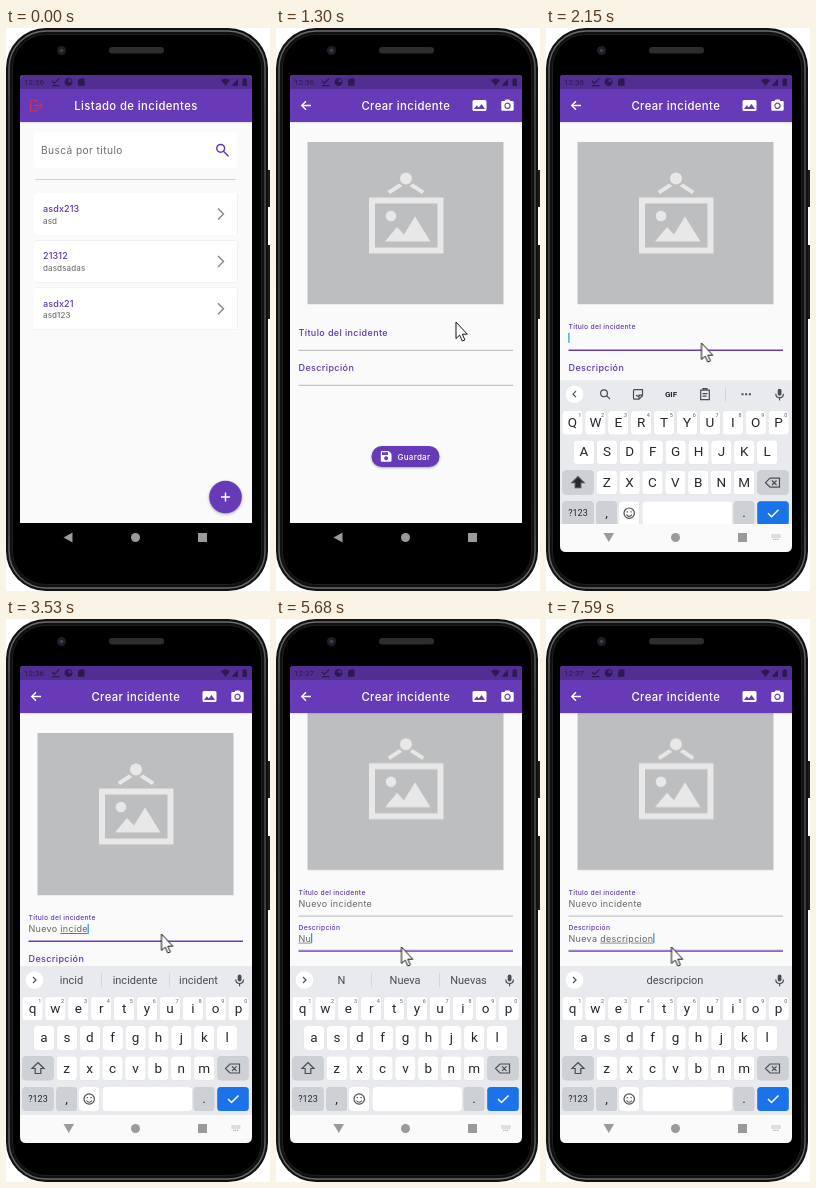
An HTML page that plays this animation: 264 px wide and 563 px high, repeating every 8 s.

```html
<!DOCTYPE html>
<html lang="es">
<head>
<meta charset="utf-8">
<title>Crear incidente</title>
<style>
  html, body { margin: 0; width: 100%; height: 100%; overflow: hidden; background: #fff; }
  svg { display: block; }
  text { font-family: Inter, "Open Sans", sans-serif; white-space: pre; }
  .mid { text-anchor: middle; }
  .title { font-size: 11.3px; font-weight: 500; fill: #fff; letter-spacing: .4px; }
  .label { font-size: 9px; font-weight: 500; fill: #5e35b1; letter-spacing: .38px; }
  .value { font-size: 9px; fill: #666; letter-spacing: .31px; }
  .word { text-decoration: underline; }
  .name { font-size: 9px; font-weight: 500; fill: #5e35b1; letter-spacing: .12px; }
  .note { font-size: 8px; font-weight: 500; fill: #757575; letter-spacing: .1px; }
  .soft { filter: drop-shadow(0 .8px .8px #0004); }
  .card { filter: drop-shadow(0 .9px .4px #0003); }
  #kb text { font-family: Roboto, "Noto Sans", sans-serif; text-anchor: middle; fill: #25282c; }
  #kb .key { font-size: 13.5px; }
  #kb.caps .key { text-transform: uppercase; }
  #kb.caps #shift { fill: #25282c; }
  #kb .sup { font-size: 5.5px; fill: #5f6368; }
  #kb .sug { font-size: 11px; fill: #4a4d51; }
  .ico { fill: none; stroke: #4a4d51; stroke-width: 1.2; }

  #cursor, #page, #kb, #scroll, #lab1, #lab2, #line1, #line2, #ripple {
    animation: 8s infinite both;
  }
  #cursor { animation-name: cursor; }
  #page { animation-name: page; }
  #kb { animation-name: rise; }
  #scroll { animation-name: scroll; }
  #lab1 { animation-name: lab1; }
  #lab2 { animation-name: lab2; }
  #line1 { animation-name: line1; }
  #line2 { animation-name: line2; }
  #ripple { animation-name: ripple; }

  @keyframes cursor {
    0%, 1.5% { transform: translate(239px, 564px); }
    6.25%, 13.1% { transform: translate(224px, 475px); }
    16.25% { transform: translate(180px, 294px); }
    19.25%, 52.9% { transform: translate(155.5px, 315px); }
    57%, 100% { transform: translate(125.5px, 328px); }
  }
  @keyframes ripple {
    0%, 9.6% { opacity: 0; }
    11%, 100% { opacity: .25; }
  }
  @keyframes page {
    0%, 10.6% { opacity: 0; transform: translateY(112px); animation-timing-function: ease-out; }
    14.4%, 100% { opacity: 1; transform: none; }
  }
  @keyframes rise {
    0%, 22.25% { transform: translateY(150px); animation-timing-function: cubic-bezier(0, 0, .2, 1); }
    28.4%, 100% { transform: none; }
  }
  @keyframes scroll {
    0%, 56.9% { transform: none; }
    59.2%, 69.2% { transform: translateY(-23.5px); }
    70.5%, 100% { transform: translateY(-25.3px); }
  }
  @keyframes lab1 {
    0%, 20% { transform: translate(22.5px, 308px); }
    22.5%, 100% { transform: translate(22.5px, 301.3px) scale(.75); }
  }
  @keyframes lab2 {
    0%, 57.9% { transform: translate(22.5px, 343px); animation-timing-function: linear; }
    60.9%, 100% { transform: translate(22.5px, 336.3px) scale(.75); }
  }
  @keyframes line1 {
    0%, 20% { stroke: #b4b4b4; stroke-width: 1px; }
    22.5%, 57.4% { stroke: #673ab7; stroke-width: 1.6px; }
    59.3%, 100% { stroke: #b4b4b4; stroke-width: 1px; }
  }
  @keyframes line2 {
    0%, 57.9% { stroke: #b4b4b4; stroke-width: 1px; }
    60.9%, 100% { stroke: #673ab7; stroke-width: 1.6px; }
  }
</style>
</head>
<body>
<svg width="264" height="563" viewBox="0 0 264 563">
  <defs>
    <clipPath id="app"><path d="M14 495V51q0-4 4-4H242q4 0 4 4V495Z"/></clipPath>
    <clipPath id="screen"><path d="M14 47H246V518q0 6-6 6H20q-6 0-6-6Z"/></clipPath>
    <linearGradient id="rim" x2="0" y2="1">
      <stop stop-color="#6b6b6b"/><stop offset=".15" stop-color="#4a4a4a"/>
      <stop offset=".85" stop-color="#4a4a4a"/><stop offset="1" stop-color="#6b6b6b"/>
    </linearGradient>
  </defs>

  <!-- phone -->
  <path d="M260 142h4v37h-4zM260 217h4v74h-4z" fill="#1c1c1c"/>
  <rect width="262" height="563" rx="40" fill="#101010"/>
  <rect x="3" y="3" width="256" height="557" rx="37" fill="none" stroke="url(#rim)" stroke-width="1.5"/>
  <rect x="6.500" y="6.500" width="249" height="550" rx="33" fill="#000" stroke="#1e1e1e"/>
  <circle cx="55.500" cy="22.500" r="4.500" fill="#1d1f22"/>
  <circle cx="55.500" cy="22.500" r="1.800" fill="#3a4450"/>
  <rect x="103" y="19" width="55" height="6.500" rx="3.200" fill="#2d2d2d"/>

  <g clip-path="url(#app)">
    <!-- list page -->
    <path d="M14 47H246V496H14Z" fill="#fafafa"/>
    <path d="M14 47H246V94H14Z" fill="#673ab7" class="soft"/>
    <path d="M14 47H246V61H14Z" fill="#522e92"/>
    <path d="M30.500 74.500v-2.300h-6v10.600h6v-2.300M28 77.500h8M33.500 74.800l2.700 2.700-2.700 2.700" fill="none" stroke="#c2355f" stroke-width="1.300"/>
    <text class="title mid" x="130" y="81.800">Listado de incidentes</text>
    <rect x="28" y="104.500" width="203" height="35.500" rx="2" fill="#fff"/>
    <text x="35" y="125.500" font-size="10.200" letter-spacing=".4" fill="#6d6d6d">Buscá por titulo</text>
    <g fill="none" stroke="#5e35b1" stroke-width="1.500">
      <circle cx="214.700" cy="120.300" r="3.900"/><path d="M217.500 123.200l5 5"/>
    </g>
    <path d="M29.500 151.500h200" stroke="#cfcfcf"/>
    <g id="cards"></g>
    <circle cx="219.500" cy="469" r="16.300" fill="#673ab7" style="filter:drop-shadow(0 1.5px 1.5px #0005)"/>
    <path d="M215 469h9M219.500 464.500v9" stroke="#fff" stroke-width="1.500"/>
    <circle id="ripple" cx="219.500" cy="469" r="16.300" fill="#fff"/>

    <!-- form page -->
    <g id="page">
      <path d="M14 47H246V496H14Z" fill="#fafafa"/>
      <g id="scroll">
        <path d="M31.500 114H227.500V276.300H31.500Z" fill="#bdbec0"/>
        <g fill="#e8e8e8">
          <path fill-rule="evenodd" d="M93 169.500h74.500v56H93Zm6 6v44h62.500v-44Z"/>
          <circle cx="130" cy="150.500" r="6"/><circle cx="115" cy="188" r="5.300"/>
          <path d="M109 213.500l12-14.500 7 7.500 11-18 15.500 25Z"/>
          <path d="M123 155.500l-11.500 7.500 2.500 3 12.500-8ZM137 155.500l11.500 7.500-2.500 3-12.500-8Z"/>
        </g>
        <path id="line1" d="M22.500 322.300H237"/>
        <path id="line2" d="M22.500 357.300H237"/>
        <text id="lab1" class="label">Título del incidente</text>
        <text id="lab2" class="label">Descripción</text>
        <text class="value" x="22.500" y="313" id="val1"><tspan></tspan><tspan class="word"></tspan></text>
        <text class="value" x="22.500" y="348" id="val2"><tspan></tspan><tspan class="word"></tspan></text>
        <rect id="caret" width="1.200" height="10" fill="#2196f3"/>
        <rect x="95.500" y="418" width="68" height="21" rx="10.500" fill="#673ab7" style="filter:drop-shadow(0 1px 1px #0005)"/>
        <path fill="#fff" fill-rule="evenodd" d="M106 423h6.700l2.800 2.800v6.700q0 1.200-1.200 1.200h-8.300q-1.200 0-1.200-1.200v-8.300q0-1.200 1.200-1.200Zm0 1.300v2.700h6v-2.700Zm4.100 4a2 2 0 1 0 .1 0Z"/>
        <text x="121.500" y="431.500" font-size="8" font-weight="500" letter-spacing=".28" fill="#fff">Guardar</text>
      </g>
      <path d="M14 47H246V94H14Z" fill="#673ab7" class="soft"/>
      <path d="M14 47H246V61H14Z" fill="#522e92"/>
      <path d="M35 77.500h-9M30 73.200l-4.300 4.300 4.300 4.300" fill="none" stroke="#fff" stroke-width="1.400"/>
      <text class="title mid" x="129.800" y="81.800">Crear incidente</text>
      <path fill="#fff" fill-rule="evenodd" d="M198 72h11q1.500 0 1.500 1.500v8q0 1.500-1.500 1.500h-11q-1.500 0-1.500-1.500v-8q0-1.500 1.500-1.500Zm0 9h11l-3.500-5-2.700 3.500-2-2.300Z"/>
      <path fill="#fff" fill-rule="evenodd" d="M226.500 73h2l1.200-1.500h3.600l1.200 1.500h2q1.200 0 1.200 1.200v7.300q0 1.200-1.200 1.200h-10q-1.200 0-1.200-1.200v-7.300q0-1.200 1.200-1.200Zm5 1.600a3.200 3.200 0 1 0 .1 0Zm0 1.200a2 2 0 1 1-.1 0Z"/>
    </g>
  </g>

  <!-- status bar -->
  <g fill="#2c1852">
    <text id="clock" x="18" y="57" font-size="8" style="font-family:Roboto,sans-serif">12:36</text>
    <path d="M46 53l2.300 2.300 5-5" fill="none" stroke="#2c1852" stroke-width="1.200"/><path d="M46 57h7.500v1.200H46z"/>
    <path fill-rule="evenodd" d="M62.500 50a4 4 0 1 0 .1 0Zm0 1a3 3 0 0 1 3 3h-3Z"/>
    <path d="M74 50.500h4.500v7.300h-6.500v-5.300Z"/>
    <path d="M215 52.200q4.500-3.600 9 0l-4.500 5.600ZM225.500 57.800h6.500v-7ZM236.500 51h1.200v-.8h2v.8h1.200v7h-4.400Z"/>
  </g>

  <g clip-path="url(#screen)">
    <g id="kb" class="caps">
      <path d="M14 347H246V530H14Z" fill="#e8eaed"/>
      <circle cx="28.500" cy="361" r="8.800" fill="#fff"/>
      <path id="toggle" class="ico"/>
      <g id="tools">
        <g class="ico">
          <circle cx="58" cy="360" r="3.400"/><path d="M60.500 362.500l3.500 3.500"/>
          <path d="M88.500 356.500h8v6l-3.500 3.500h-4.500q-1 0-1-1v-7.500q0-1 1-1ZM96.500 362h-3.500v4M90 360v.1M94 360v.1M90 362q2 2 4 0"/>
          <path d="M154.700 357h8.600v9.500h-8.600ZM157 357v-1.500h4v1.500M156.500 360.500h5M156.500 363h4"/>
        </g>
        <text x="125" y="364" font-size="8" font-weight="700">GIF</text>
        <path d="M179.500 354v14" stroke="#cfd2d6"/>
        <path d="M195.500 361h2m1.700 0h2m1.700 0h2" stroke="#4a4d51" stroke-width="2"/>
      </g>
      <g id="sugs">
        <path id="bars" d="M95.500 354v14M163.500 354v14" stroke="#d3d6da"/>
        <text class="sug" x="65.500" y="365"></text>
        <text class="sug" x="129" y="365"></text>
        <text class="sug" x="192.500" y="365"></text>
      </g>
      <rect x="231.700" y="355.500" width="3.800" height="7" rx="1.900" fill="#4a4d51"/>
      <path class="ico" d="M229.800 360.500q0 4 3.800 4t3.800-4M233.600 364.500v2.700"/>
      <g id="keys"></g>
      <path id="shift" class="ico" d="M32 443.500l6 6h-3.200v5h-5.600v-5H26Z"/>
      <path class="ico" d="M224 445h9.500v9H224l-4.500-4.500ZM226 447.300l4.500 4.500M230.500 447.300l-4.500 4.500"/>
      <g class="ico"><circle cx="83.200" cy="480" r="5.200"/><path d="M80.500 481.500q2.700 3.500 5.400 0M81.300 478v1.200M85.100 478v1.200"/></g>
      <path d="M222 480l3.500 3.500 7-7" fill="none" stroke="#fff" stroke-width="1.500"/>
    </g>
    <path id="navbg" d="M14 496H246V524H14Z" fill="#fafafa"/>
    <g fill="#9a9a9a">
      <path id="back"/>
      <circle cx="129.500" cy="509.500" r="4.500"/>
      <path d="M192 505h9v9h-9z"/>
      <path id="kbicon" d="M225.500 507h9M225.500 509h9M227 511.300h6" fill="none" stroke="#a8a8a8" stroke-dasharray="1.300 .6"/>
    </g>
  </g>

  <path id="cursor" d="M0 0V16.500l3.700-3.400 2.600 5.900 2.600-1.100-2.600-5.700h5Z" fill="#fff" stroke="#111" stroke-linejoin="round"/>
</svg>
<script>
const $ = id => document.getElementById(id);

// List cards
$('cards').innerHTML = [['asdx213', 'asd'], ['21312', 'dasdsadas'], ['asdx21', 'asd123']].map(([name, note], i) => {
  const y = 165 + i * 47.4;
  return `<rect class="card" x="28" y="${y}" width="203.500" height="42" rx="2" fill="#fff"/>
    <text class="name" x="37" y="${y + 19}">${name}</text><text class="note" x="37" y="${y + 30.5}">${note}</text>
    <path d="M212 ${y + 15.5}l5.500 5.500-5.500 5.500" fill="none" stroke="#858585" stroke-width="1.400"/>`;
}).join('');

// Keyboard
const key = (x, y, w, fill, s = '', cls = 'key', dy = 4.3) =>
  `<rect x="${x - w / 2}" y="${y - 12}" width="${w}" height="24" rx="3.500" fill="${fill}" style="filter:drop-shadow(0 .7px .3px #0003)"/>
   <text class="${cls}" x="${x}" y="${y + dy}">${s}</text>`;
const row = (s, x, y) => [...s].map((c, i) => key(x + i * 22.9, y, 20.5, '#fff', c)).join('');
const grey = '#cdd0d5';
$('keys').innerHTML = row('qwertyuiop', 26.5, 389.5) + row('asdfghjkl', 38, 419) + row('zxcvbnm', 60.7, 449.3) +
  [...'1234567890'].map((c, i) => `<text class="sup" x="${33.7 + i * 22.9}" y="384">${c}</text>`).join('') +
  key(32, 449.3, 31, grey) + key(227, 449.3, 31, grey) +
  key(32, 480, 31, grey, '<tspan font-size="9">?123</tspan>', '', 3.3) +
  key(60.7, 480, 20.5, grey, ',') + key(83.2, 480, 20.5, '#fff') + key(141.3, 480, 90, '#fff') +
  key(198, 480, 20.5, grey, '.') + key(227, 480, 31.5, '#1a73e8');

// [time, fixed text, composing word, suggestions]
const nuevo = w => [w, 'Nuevo', 'Nueva'], inc = w => [w, 'incidente', 'incident'];
const nueva = w => [w, 'Nueva', 'Nuevas'], des = w => [w, 'descripcion', 'description'];
const A = 'Nuevo ', B = 'Nueva ';
const title = [
  [0, '', ''],
  [2480, '', 'N', nuevo('N')], [2670, '', 'Nu', nuevo('N')], [2760, '', 'Nue', nuevo('Nu')],
  [2860, '', 'Nuev', nuevo('Nue')], [2950, '', 'Nuevo', nuevo('Nuev')], [3050, A, '', nuevo('Nuevo')],
  [3190, A, 'i', inc('i')], [3260, A, 'in', inc('i')], [3330, A, 'inc', inc('in')],
  [3400, A, 'inci', inc('inc')], [3460, A, 'incid', inc('inci')], [3530, A, 'incide', inc('incid')],
  [3620, A, 'inciden', inc('incide')], [3690, A, 'incident', inc('inciden')],
  [3760, A, 'incidente', inc('incident')], [3950, A, 'incidente', ['incidente', 'incidentes', 'incident']],
  [4640, A + 'incidente', '']
];
const descr = [
  [0, '', ''],
  [5540, '', 'N', nueva('N')], [5630, '', 'Nu', nueva('N')], [5720, '', 'Nue', nueva('Nu')],
  [5820, '', 'Nuev', nueva('Nue')], [5910, '', 'Nueva', nueva('Nuev')], [6000, B, '', nueva('Nueva')],
  [6050, B, 'd', des('d')], [6100, B, 'de', des('d')], [6150, B, 'des', des('de')],
  [6340, B, 'desc', des('des')], [6480, B, 'descr', des('desc')], [6570, B, 'descri', des('descr')],
  [6800, B, 'descrip', des('descri')], [6980, B, 'descrip', des('descrip')],
  [7170, B, 'descripc', des('descrip')], [7250, B, 'descripci', des('descripc')],
  [7320, B, 'descripcio', des('descripci')], [7400, B, 'descripcion', ['descripcio', 'descripcion', '']],
  [7590, B, 'descripcion', ['', 'descripcion', '']]
];
const at = (steps, t) => steps.filter(s => s[0] <= t).pop();
const show = (id, on) => { $(id).style.display = on ? '' : 'none'; };

function fill(el, [, fixed, word]) {
  el.children[0].textContent = fixed;
  el.children[1].textContent = word;
  return fixed + word ? el.getComputedTextLength() : 0;
}

const start = performance.now();
function draw() {
  const t = (performance.now() - start) % 8000;
  const second = t >= 4640, kbUp = t >= 1780;
  const a = at(title, t), b = at(descr, t);
  const wa = fill($('val1'), a), wb = fill($('val2'), b);

  $('caret').setAttribute('x', 22.3 + (second ? wb : wa));
  $('caret').setAttribute('y', second ? 339.5 : 304.8);
  show('caret', t >= 1700 && !(t >= 5170 && t < 5540));

  const sugs = (second ? b : a)[3];
  show('tools', !sugs);
  show('sugs', sugs);
  if (sugs) {
    document.querySelectorAll('.sug').forEach((el, i) => { el.textContent = sugs[i]; });
    show('bars', sugs[0]);
  }
  $('toggle').setAttribute('d', sugs ? 'M27 358l3 3-3 3' : 'M30 358l-3 3 3 3');
  $('kb').classList.toggle('caps', t < 2480);
  $('clock').textContent = t < 5260 ? '12:36' : '12:37';

  // The keyboard slides by CSS, so it is hidden without restarting its animation
  $('kb').style.visibility = kbUp ? 'visible' : 'hidden';
  show('navbg', kbUp);
  show('kbicon', kbUp);
  $('back').setAttribute('d', kbUp ? 'M57.500 505h10.500l-5.200 9Z' : 'M66.500 504.500v10l-9-5Z');
  requestAnimationFrame(draw);
}
draw();
</script>
</body>
</html>
```
